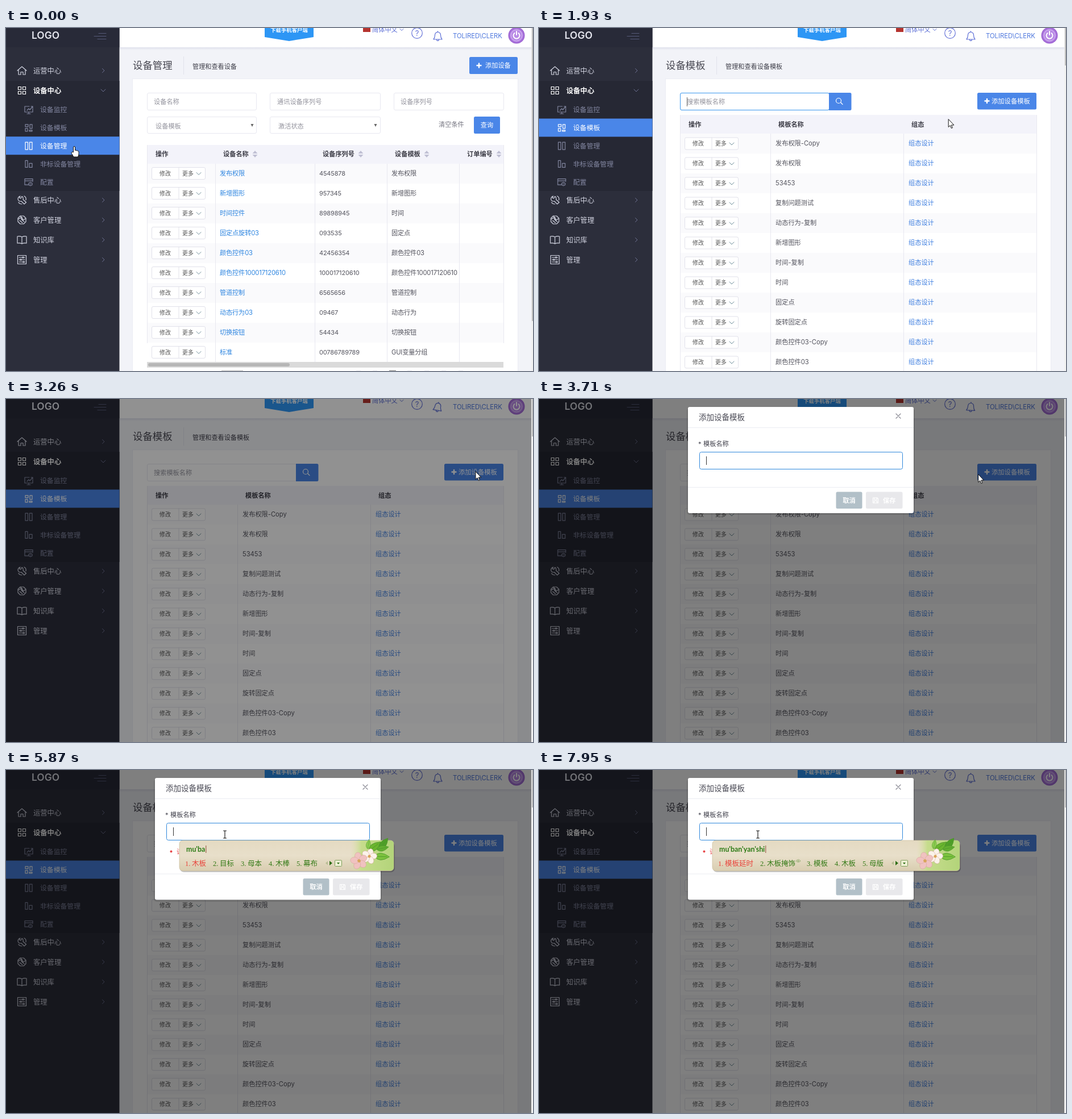
An HTML page for the animation above (8 s loop, 927 by 604 pixels).

```html
<!DOCTYPE html>
<html lang="zh-CN">
<head>
<meta charset="utf-8">
<title>设备模板</title>
<style>
html, body { margin: 0; width: 100%; height: 100%; overflow: hidden; background: #f2f3f8; }
svg { display: block; width: 927px; height: 604px; }
text { font-family: Inter, "Noto Sans CJK SC", "Noto Sans CJK", sans-serif; white-space: pre; }
text.cand { font-family: "Liberation Serif", "Noto Sans CJK SC", serif; }
text.pinyin { font-family: Lato, sans-serif; }
</style>
</head>
<body>
<svg id="stage" viewBox="0 0 927 604" xmlns="http://www.w3.org/2000/svg"></svg>
<script>
const LOOP = 8000, BLUE = '#4a86e8', LINK = '#3f7fe0', LINE = '#e8e8f0', GREEN = '#357a17';

// ---- drawing helpers: each returns markup; text is centred vertically on y ----
const text = (x, y, s, fill = '#55555f', size = 11.2, more = '') =>
  `<text x="${x}" y="${y + size * .37}" font-size="${size}" fill="${fill}" ${more}>${s}</text>`;
const bold = 'font-weight="600"', mid = 'text-anchor="middle"';
const rect = (x, y, w, h, fill, more = '') =>
  `<rect x="${x}" y="${y}" width="${w}" height="${h}" fill="${fill}" ${more}/>`;
const box = (x, y, w, h, fill = '#fff', line = LINE, r = 2.5) =>
  rect(x + .5, y + .5, w - 1, h - 1, fill, `stroke="${line}" rx="${r}"`);
const path = (x, y, d, line = 'currentColor', w = 1.2, fill = 'none') =>
  `<path transform="translate(${x} ${y})" d="${d}" fill="${fill}" stroke="${line}" stroke-width="${w}" stroke-linejoin="round" stroke-linecap="round"/>`;
const vline = (x, y, h, fill = LINE, more = '') => rect(x, y, 1, h, fill, more);
const group = (id, s) => `<g id="${id}">${s}</g>`;
const plus = (x, y) => path(x, y, 'M-3.5 0H3.5M0-3.5V3.5', '#fff', 2.4);

// ---- side menu ----
const RIGHT = 'M-1.5-3.5L2 0L-1.5 3.5', DOWN = 'M-4-2L0 2L4-2';
const menu = [
  [75, '运营中心', 'M-8 0L0-7L8 0M-6-1.5V7H-2V2.5H2V7H6V-1.5'],
  [110, '设备中心', 'M-6.5-6.5h5v5h-5zM1.5-6.5h5v5h-5zM-6.5 1.5h5v5h-5zM1.5 1.5h5v5h-5z'],
  [303, '售后中心', 'M-3-7A5 5 0 0 0-6.5 0A5 5 0 0 0-1 2L4 7L7.5 4L2-1A5 5 0 0 0 0-6.5L-2-3L-4.5-4zM4-7Q8-5 7 0M-6 4Q-4 7 0 7'],
  [338, '客户管理', 'M-3-7H3L7-3V3L3 7H-3L-7 3V-3zM-7-1L-2-4L2 0L6-2M-4 1L1 5M-1-1L4 3M-3-7L1-3'],
  [373, '知识库', 'M0-5Q-4-7-8-6V6Q-4 5 0 7Q4 5 8 6V-6Q4-7 0-5V7'],
  [408, '管理', 'M-7.5-7.5h15v15h-15zM-5-4H0M3-4H5M-5 0H-3M0 0H5M-5 4H1M4 4H5M1-5v2h2v-2zM-3-1v2h2v-2zM2 3v2h2v-2z']
];
const subs = [
  ['设备监控', 'M7-2V4H-7V-6H1M-3 7H3M0 4V7M-3 1L0-2L2 0L7-6M4-6H7V-3'],
  ['设备模板', 'M-6-6h5v4h-5zM2-6h4v7h-4zM-6 1h4v5h-4zM1 4h5v2h-5z'],
  ['设备管理', 'M-6-6.5h4.5v13h-4.5zM1.5-6.5h4.5v13h-4.5z'],
  ['非标设备管理', 'M-6-6h4v12h-4zM1-1h5v7h-5z'],
  ['配置', 'M7-1V-5.5H-7V5H-1M-7-2H7M3 .5L6 2V5L3 6.5L0 5V2zM3 3v1']
];
const sidebar = () => rect(0, 0, 199.5, 604, '#2c2e3b') + rect(0, 0, 199.5, 34, '#282a38') +
  rect(0, 93, 199.5, 194, '#262834') + text(45, 13, 'LOGO', '#e6e7ef', 17.4, bold) +
  path(155, 14.5, 'M8-5H21M0 0H21M6 5H21', '#565a78', 1) +
  rect(0, 191, 199.5, 32, BLUE, 'id="active"') +
  menu.map(([y, s, d], i) => {
    const c = i == 1 ? '#fff' : '#d3d5e2';
    return path(28, y, d, c) + text(48, y, s, c, 12.3, i == 1 ? bold : '') +
      path(171, y, i == 1 ? DOWN : RIGHT, '#6d7192', 1);
  }).join('') +
  subs.map(([s, d], i) => group('sub' + i,
    path(40, 144 + i * 31.8, d) + text(60, 144 + i * 31.8, s, 'currentColor', 11.85))).join('');

// ---- top bar ----
const topbar = () => rect(199, 34, 725, 5, 'url(#under)') + rect(199, 0, 725, 34, '#fff') +
  '<path d="M455 0H541V16L498 23L455 16Z" fill="#2d96f5"/>' +
  text(498, 4, '下载手机客户端', '#fff', 9.4, mid + ' ' + bold) +
  rect(628, 0, 13, 7, '#b5342f') + text(644, 3, '简体中文', '#5d6fd6') + path(696, 3, 'M-3-1.5L0 1.5L3-1.5', '#5d6fd6', 1) +
  '<circle cx="723" cy="9" r="9.3" fill="none" stroke="#6673d8" stroke-width="1.2"/>' +
  text(723, 9.3, '?', '#6673d8', 13, mid) +
  group('bell', path(759.5, 14, 'M-7.5 6H7.5Q5 3 5-1.5Q5-6 0-7Q-5-6-5-1.5Q-5 3-7.5 6zM-2 6Q-2 8.5 0 8.5T2 6M0-7V-8.5', '#5d6fd6')) +
  text(786, 14, 'TOLIRED\\CLERK', '#4f78dd', 11.3) +
  '<circle cx="898" cy="13" r="14.5" fill="url(#orb)"/>' +
  '<circle cx="898" cy="13" r="10" fill="#b98ae6" stroke="#dcc3f5" stroke-width="1"/>' +
  path(898, 13, 'M-3.5-4A5.5 5.5 0 1 0 3.5-4M0-7V-1', '#fff', 2);

// ---- pages ----
const heading = (title, note) => text(223, 66, title, '#474751', 17.4) + vline(312, 50, 32, '#e1e2ec') +
  text(328, 67.5, note, '#3f3f4a', 11.15);
const card = () => rect(222, 89, 679, 515, '#ebecf3') + rect(223, 90, 677, 514, '#fff');
const rowButtons = y => box(256, y - 11, 95, 22, '#fff', '#e1e1ea') + vline(303.5, y - 11, 22, '#e1e1ea') +
  text(270, y, '修改', '#555', 9.9) + text(310, y, '更多', '#555', 9.9) + path(339, y + .5, DOWN, '#6f8f9a', 1);
const sorter = (x, y) => `<path d="M${x - 4.5} ${y - 1}h9l-4.5-5zm0 2h9l-4.5 5z" fill="#c0c0d4"/>`;
const stripes = (y, n) => Array.from({ length: n }, (_, i) =>
  rect(248, y + i * 35, 627, 35, i % 2 ? '#fff' : '#fafafc')).join('');
const field = (x, y, w, h, s, tx, dy = 0) => box(x, y, w, h) + text(tx, y + h / 2 + .5 + dy, s, '#93939d');

const devices = [
  ['发布权限', '4545878', '发布权限'], ['新增图形', '957345', '新增图形'], ['时间控件', '89898945', '时间'],
  ['固定点旋转03', '093535', '固定点'], ['颜色控件03', '42456354', '颜色控件03'],
  ['颜色控件100017120610', '100017120610', '颜色控件100017120610'], ['管道控制', '6565656', '管道控制'],
  ['动态行为03', '09467', '动态行为'], ['切换按钮', '54434', '切换按钮'], ['标准', '00786789789', 'GUI变量分组']
];
const tight = 'letter-spacing="-.15"';
const devicePage = () => heading('设备管理', '管理和查看设备') +
  rect(815, 51, 85, 30, BLUE, 'rx="2.5"') + plus(832, 66) + text(843, 66, '添加设备', '#fff') + card() +
  field(248, 114, 193, 31, '设备名称', 260) + field(464, 114, 195, 31, '通讯设备序列号', 477) +
  field(682, 114, 194, 31, '设备序列号', 694) + field(248, 156, 193, 30, '设备模板', 263, 1.5) +
  field(464, 156, 195, 30, '激活状态', 479, 1.5) +
  [433, 650].map(x => `<path d="M${x - 2.5} 169h5l-2.5 5z" fill="#666"/>`).join('') +
  text(761, 170, '清空条件', '#777782') + rect(823, 156, 46, 30, BLUE, 'rx="2.5"') + text(846, 171, '查询', '#fff', 11.2, mid) +
  stripes(239, 10) + rect(248, 206, 627, 33, '#f3f3fa') +
  [[263, '操作'], [382, '设备名称', 438], [557, '设备序列号', 624], [684, '设备模板', 740], [811, '订单编号', 867]]
    .map(([x, s, k]) => text(x, 222, s, '#3c3c46', 11.2, bold) + (k ? sorter(k, 222) : '')).join('') +
  [248, 368, 543, 670, 797, 875].map(x => vline(x, x > 248 && x < 875 ? 239 : 206, 349)).join('') +
  devices.map((r, i) => {
    const y = 256 + i * 35;
    return rowButtons(y) + text(376, y, r[0], '#2f86e0', 11.2, tight) + text(551, y, r[1], '#55555f', 11, tight) +
      text(678, y, r[2], '#55555f', 11.2, tight);
  }).join('') +
  rect(248, 588, 627, 10, '#dadada') + rect(250, 590, 249, 6, '#b6b6b6', 'rx="3"') +
  rect(379, 603, 38, 1, '#bbb') + rect(674, 603, 12, 1, '#777') +
  [620, 649, 710, 740, 770, 800].map(x => rect(x - 4, 603, 8, 1, '#ececf2')).join('');

const templates = ['发布权限-Copy', '发布权限', '53453', '复制问题测试', '动态行为-复制', '新增图形', '时间-复制',
  '时间', '固定点', '旋转固定点', '颜色控件03-Copy', '颜色控件03'];
const templatePage = () => heading('设备模板', '管理和查看设备模板') + card() +
  field(248, 114, 263, 31, '搜索模板名称', 260) +
  group('focus', box(248, 114, 263, 31, 'none', '#3a97ee')) + vline(260, 122, 16, '#666', 'id="searchCaret"') +
  `<path d="M510 114h37q2.5 0 2.5 2.5v26q0 2.5-2.5 2.5h-37z" fill="${BLUE}"/>` +
  path(528, 129, 'M3.5-1A4.5 4.5 0 1 1-5.5-1A4.5 4.5 0 1 1 3.5-1M2.5 2L6 5.5', '#fff') +
  rect(771, 114, 104, 29.5, BLUE, 'rx="2.5"') + plus(788, 128.5) + text(796, 128.5, '添加设备模板', '#fff', 11.3) +
  rect(248, 153, 627, 33, '#f3f3fa') +
  [[263, '操作'], [421, '模板名称'], [655, '组态']].map(([x, s]) => text(x, 170, s, '#3c3c46', 11.2, bold)).join('') +
  group('rows', stripes(186, 12) + templates.map((s, i) => {
    const y = 203.5 + i * 35;
    return rowButtons(y) + text(416, y - .5, s) + text(650, y - .5, '组态设计', LINK);
  }).join('')) +
  [248, 407, 641, 875].map(x => vline(x, x == 407 || x == 641 ? 186 : 153, 451)).join('');

// ---- dialog ----
const dialog = () => rect(260, 16, 401, 188, '#000', 'id="shade" opacity=".12" rx="5"') +
  rect(262, 14, 397, 187, '#fff', 'id="sheet" rx="3"') +
  text(281, 32.5, '添加设备模板', '#4a4a55', 13.5) + path(632, 30, 'M-4-4L4 4M4-4L-4 4', '#8a8a94', 1.2) +
  rect(262, 50, 397, 1, '#ebedf2') + text(280, 80, '*', '#4a4a55') + text(289, 79, '模板名称', '#3f3f4a') +
  group('inputLine', box(282, 93, 358, 31, '#fff', '#2f88dc', 3)) +
  vline(294, 101, 15, '#333', 'id="caret"') +
  group('error', '<circle cx="290.5" cy="143.5" r="2" fill="#e8484a"/>' + text(300, 143.5, '请输入模板名称', '#e8484a')) +
  group('footer', rect(262, 155, 397, 1, '#ebedf2') + rect(522.5, 163.5, 46, 29.5, '#b2c0c8', 'rx="2.5"') +
    text(545.5, 178.5, '取消', '#fff', 11.2, mid + ' ' + bold) + rect(575, 163.5, 64.5, 29.5, '#e8e8eb', 'rx="2.5"') +
    path(592, 178.5, 'M-4.5-4.5H3L4.5-3V4.5H-4.5zM-2-4V-1H2V-4M-2.5 4V1H2.5V4', '#fff') + text(605, 178.5, '保存', '#fff', 11.2, bold)) +
  group('suggest', box(281, 124, 360, 39.5, '#fff', '#c9c9cf', 0) +
    text(288, 134.5, '动态行为-复制', '#111', 9.8, 'font-weight="700"') +
    text(288, 153.5, '发布权限-Copy', '#111', 9.8, 'font-weight="700"'));

// ---- input method panel ----
const petals = (fill, r) => [0, 72, 144, 216, 288].map(a =>
  `<ellipse cy="${-r}" rx="${r * .72}" ry="${r * .9}" fill="${fill}" stroke="#d3a29a" stroke-width=".5" transform="rotate(${a})"/>`).join('') +
  `<circle r="${r * .35}" fill="#d9a55a"/>`;
const leaf = (x, y, a, k, fill) =>
  `<path transform="translate(${x} ${y}) rotate(${a}) scale(${k})" d="M0 0Q8-11 24 0Q8 11 0 0zM2 0H20" fill="${fill}" stroke="#4a942a" stroke-width=".7"/>`;
const blossom = () => '<path d="M-76 124H-6Q0 124 0 130V171Q0 177-6 177H-76Z" fill="url(#meadow)"/>' +
  leaf(-44, 143, -38, 1.1, '#6bb52f') + leaf(-25, 139, -52, 1, '#4f9f28') + leaf(-34, 152, 2, 1.1, '#7cc23e') +
  leaf(-46, 139, -80, .7, '#8fce52') + leaf(-30, 140, -12, .9, '#62ae30') +
  `<g transform="translate(-43 152) rotate(15)">${petals('#fbf3ea', 7.2)}</g>` +
  `<g transform="translate(-61 160) rotate(-12)">${petals('#f0c2c0', 8)}</g>`;
const cloud = (x, y, k) => `<path transform="translate(${x} ${y}) scale(${k})" d="M-7 1Q-6-3-2-3Q0-6 3-3Q7-2 7 1Q3 4 0 4T-7 1zM-2 .5a2 1.5 0 1 0 4 0a2 1.5 0 1 0-4 0" fill="none" stroke="#5f8f3a"/>`;

// A lone ~ is a pending online candidate; a trailing ~ leaves room for its badge.
const typing = [
  [5320, "m", '吗 没 么 面 们'], [5400, "mu", '木 目 母 亩 幕'],
  [5720, "mu'b", '目标 木板 母本 幕布 木棒'], [5870, "mu'ba", '木板 目标 母本 木棒 幕布'],
  [5950, "mu'ban", '模板 木板 母版 目标 木棒'], [6500, "mu'ban'y", '模板一 ~ 穆半月~ 模板 木板'],
  [6960, "mu'ban'ya", '模板呀 ~ 木板牙~ 模板 木板'], [7110, "mu'ban'yan", '模板眼 木板眼~ 模板 木板 母版'],
  [7340, "mu'ban'yan's", '模板颜色 ~ 模板 木板 母版'], [7500, "mu'ban'yan'sh", '模板延时 ~ 模板 木板 母版'],
  [7720, "mu'ban'yan'shi", '模板延时 ~ 模板 木板 母版'], [7870, "mu'ban'yan'shi", '模板延时 木板掩饰~ 模板 木板 母版']
];
function panel([, typed, list]) {
  const words = list.split(' '), pending = words.includes('~');
  let x = 315, out = '';
  words.forEach((c, i) => {
    const word = c.replace('~', ''), fill = i ? GREEN : '#e8453c';
    if (word) {
      out += text(x, 164, i + 1 + '.', fill, 12.5, 'class="cand"') + text(x + 12, 164, word, fill, 12.5, 'class="cand"');
      x += 13 + 12.5 * word.length;
      if (c != word) {
        if (!pending) out += cloud(x + 4, 160, .55);
        x += 8;
      }
    } else {
      out += cloud(x + 20, 164, 1);
      x += 31;
    }
    x += 11;
  });
  const end = x - 11, right = end + 133;
  return rect(306, 127, right - 304, 53, '#000', 'rx="7" opacity=".22"') +
    rect(305, 124, right - 305, 53.5, 'url(#paper)', 'rx="6" stroke="#cbbd9b" stroke-width=".7"') +
    `<g transform="translate(${right} 0)">${blossom()}</g>` +
    text(317, 139.5, typed, '#2b7a14', 12.4, 'class="pinyin" font-weight="700" id="typed"') +
    vline(0, 133, 13, '#8f4a35', 'id="mark"') + out +
    `<path d="M${end + 17} 160.5v7l-4-3.5z" fill="#b9bd94"/><path d="M${end + 20} 160v8l5-4z" fill="#2f6e16"/>` +
    box(end + 29, 158.5, 13, 11.5, '#eff0d5', '#7da05a', 1) + `<path d="M${end + 33} 163h5l-2.5 3z" fill="#2f6e16"/>`;
}

// ---- assemble ----
const stop = (o, c, a = 1) => `<stop offset="${o}" stop-color="${c}" stop-opacity="${a}"/>`;
const svg = document.getElementById('stage');
svg.innerHTML = '<defs>' +
  `<linearGradient id="under" x2="0" y2="1">${stop(0, '#dfe1ec')}${stop(1, '#f2f3f8')}</linearGradient>` +
  `<radialGradient id="orb">${stop(.5, '#c79bf0')}${stop(1, '#9a5fd0')}</radialGradient>` +
  `<linearGradient id="paper" x2="0" y2="1">${stop(0, '#e4dac2')}${stop(.5, '#e8dfca')}${stop(1, '#d9cdb0')}</linearGradient>` +
  `<linearGradient id="meadow">${stop(0, '#dfe0b0', 0)}${stop(.25, '#c6dc8c')}${stop(1, '#b3d47a')}</linearGradient></defs>` +
  rect(0, 0, 927, 604, '#f2f3f8') + group('page0', devicePage()) + group('page1', templatePage()) +
  topbar() + sidebar() + rect(0, 591, 307, 13, '#dfe1e5', 'id="bubble"') +
  rect(0, 0, 924, 604, '#000', 'id="veil"') + group('dialog', dialog()) + group('ime', '') +
  rect(924, 0, 3, 604, '#f1f1f1') + rect(925, 0, 2, 66, '#bcbcbc', 'id="thumb"') +
  group('arrow', path(0, 0, 'M0 0V13.5L3.1 10.7L5.2 15.6L7.2 14.8L5.2 10H9.4Z', '#111', 1, '#fff')) +
  group('hand', path(0, 0, 'M-1.5 9.5V1Q-1.5-.5 0-.5T1.5 1V6.5Q3 5.5 4 7Q5.5 6.3 6.2 7.6Q8 7.2 8 9V12.5Q8 15 6.5 18H-1L-4.8 11.5Q-5.3 9.5-3.6 9.3Z', '#111', 1, '#fff')) +
  group('beam', path(0, 0, 'M-2.5-6.5H-.8L0-5.8L.8-6.5H2.5M0-5.8V5.8M-2.5 6.5H-.8L0 5.8L.8 6.5H2.5', '#111', 1.1));

// ---- motion ----
const $ = {};
svg.querySelectorAll('[id]').forEach(e => $[e.id] = e);
const show = (e, on) => e.style.display = on ? '' : 'none';
const set = (e, k, v) => e.setAttribute(k, v);
const ramp = (t, a, b) => Math.min(1, Math.max(0, (t - a) / (b - a)));
const blink = (t, start) => t >= start && (t - start) % 1060 < 530;
const route = [[0, 120, 209], [60, 120, 209], [300, 74, 174], [1010, 74, 174], [1700, 630, 196], [1930, 720, 161],
  [2500, 826, 128], [3520, 826, 128], [3900, 720, 138], [4600, 385, 113.5], [LOOP, 385, 113.5]];
function pointer(t) {
  const i = route.findIndex(p => p[0] > t), [a, x, y] = route[i - 1], [b, u, v] = route[i];
  const k = ramp(t, a, b);
  return [x + (u - x) * k, y + (v - y) * k];
}
let shown = -1;

function update(t) {
  const second = t >= 930, enter = ramp(t, 930, 1260), ease = enter * enter * (3 - 2 * enter);
  show($.page0, !second);
  show($.page1, second);
  set($.page1, 'opacity', ease);
  set($.page1, 'transform', `translate(0 ${20 * (1 - ease)})`);
  show($.rows, t >= 1240);
  set($.thumb, 'height', t >= 1240 ? 66 : 516);
  set($.active, 'y', second ? 159.5 : 191.2);
  subs.forEach((_, i) => $['sub' + i].style.color = i == (second ? 1 : 2) ? '#fff' : '#8286a0');
  show($.focus, t >= 1640 && t < 2780);
  show($.searchCaret, t < 2780 && blink(t, 1700));
  set($.bubble, 'opacity', t < 460 || t >= 1850 ? 0 : t < 540 || t >= 1770 ? .5 : 1);
  const swing = t >= 2620 && t < 5400 ? 10 * Math.cos((t - 3260) / 250 * 2 * Math.PI) : 0;
  set($.bell, 'transform', `rotate(${swing} 759.5 14)`);

  set($.veil, 'opacity', .5 * ramp(t, 3140, 3280));
  const open = ramp(t, 3330, 3630), drop = 1 - (1 - open) ** 2, grown = t >= 5320;
  show($.dialog, open > 0);
  set($.dialog, 'opacity', drop);
  set($.dialog, 'transform', `translate(0 ${-46 * (1 - drop)})`);
  set($.sheet, 'height', grown ? 214.5 : 187);
  set($.shade, 'height', grown ? 216 : 188);
  set($.footer, 'transform', `translate(0 ${grown ? 27.5 : 0})`);
  show($.error, grown);
  show($.suggest, t >= 4680 && !grown);
  set($.inputLine.firstChild, 'stroke', t >= 3680 ? '#2f88dc' : LINE);
  show($.caret, blink(t, 3680));

  const now = typing.filter(s => s[0] <= t).length - 1;
  if (now != shown) {
    shown = now;
    $.ime.innerHTML = now < 0 ? '' : panel(typing[now]);
    if (now >= 0) set($.ime.querySelector('#mark'), 'x', 318 + $.ime.querySelector('#typed').getComputedTextLength());
  }

  const [x, y] = pointer(t);
  const kind = t < 930 ? 'hand' : t > 3600 && x > 282 && x < 640 && y > 93 && y < 124 ? 'beam' : 'arrow';
  ['hand', 'arrow', 'beam'].forEach(k => {
    show($[k], k == kind && !(t >= 760 && t < 930));
    set($[k], 'transform', `translate(${x} ${y})`);
  });
}

const start = performance.now();
function tick() {
  update((performance.now() - start) % LOOP);
  requestAnimationFrame(tick);
}
tick();
</script>
</body>
</html>
```
